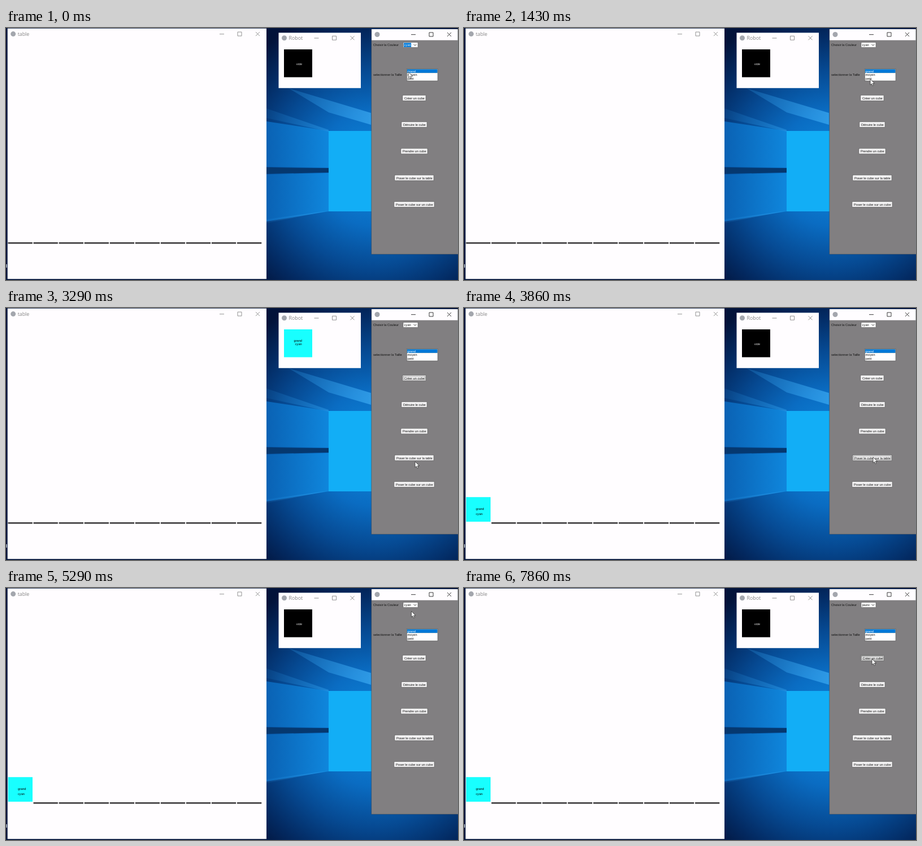
Animation, 800 px wide and 448 px high, one loop 8000 ms. Source, as an HTML page:

```html
<!DOCTYPE html>
<html lang="fr">
<head>
<meta charset="utf-8">
<title>Robot et cubes</title>
<style>
  html, body { margin: 0; width: 100%; height: 100%; overflow: hidden; background: #04183f; }
  svg { display: block; width: 800px; height: 448px; }
  text { font: 5.65px "Liberation Sans", Arial, sans-serif; white-space: pre; }
  .title { font: 8.8px "Open Sans", sans-serif; fill: #858585; }
</style>
</head>
<body>
<svg viewBox="0 0 800 448">
  <defs>
    <radialGradient id="sky" gradientUnits="userSpaceOnUse" cx="650" cy="250" r="290">
      <stop offset="0" stop-color="#0d8be0"/>
      <stop offset=".35" stop-color="#0a6cc2"/>
      <stop offset=".6" stop-color="#064a93"/>
      <stop offset=".82" stop-color="#032a62"/>
      <stop offset="1" stop-color="#02133a"/>
    </radialGradient>
    <linearGradient id="beam">
      <stop offset="0" stop-color="#0a62b4"/>
      <stop offset="1" stop-color="#0f86dc"/>
    </linearGradient>
    <linearGradient id="glow">
      <stop offset="0" stop-color="#2a9df0" stop-opacity=".1"/>
      <stop offset="1" stop-color="#4bbcff" stop-opacity=".55"/>
    </linearGradient>
    <clipPath id="comboText"><rect x="703" y="25" width="14.5" height="10"/></clipPath>
  </defs>
  <rect width="800" height="448" fill="#03153c"/>
  <rect x="461" width="339" height="448" fill="url(#sky)"/>
  <path d="M461 166L571 183V248L461 247ZM461 260L571 258V326L461 344Z" fill="url(#beam)"/>
  <path d="M461 143L571 181V184L461 160ZM500 107L646 151V172L571 150ZM571 325L461 340V347Z" fill="url(#glow)"/>
  <path d="M461 248L571 249V257L461 259Z" fill="#05386f"/>
  <rect x="571" y="183" width="143" height="143" fill="#12aef6"/>
  <rect y="420" width="1.6" height="6" fill="#aeb6c4"/>
  <g id="windows"></g>
  <g id="live"></g>
</svg>
<script>
const WHITE = '#fffdff', BLUE = '#0078d7', CYAN = '#18ffff', BLACK = '#000';
const FPS = 7, LOOP = 8000;

const rect = (x, y, w, h, fill, extra = '') =>
  `<rect x="${x}" y="${y}" width="${w}" height="${h}" fill="${fill}" ${extra}/>`;
const text = (x, y, string, fill = '#111', extra = '') =>
  `<text x="${x}" y="${y}" fill="${fill}" ${extra}>${string}</text>`;
const stroke = (d, color, width = 1) =>
  `<path d="${d}" fill="none" stroke="${color}" stroke-width="${width}"/>`;

// x, y: centre of the minimise button; the other two follow to its right
function windowFrame(left, top, width, height, title, x, y, ink) {
  return rect(left, top, width, height, WHITE) +
    `<circle cx="${left + 10}" cy="${y}" r="4.5" fill="#a3a6ad"/>` +
    `<text class="title" x="${left + 18}" y="${y + 3.6}">${title}</text>` +
    stroke(`M${x - 4} ${y + .2}h8M${x + 28} ${y - 3.5}h7v7h-7zM${x + 60} ${y - 3.5}l7 7m0 -7l-7 7`, ink, .9);
}

const buttons = [
  ['Créer un cube', 41, 119.7], ['Détruire le cube', 45, 167],
  ['Prendre un cube', 47, 214.3], ['Poser le cube sur la table', 69, 261.6],
  ['Poser le cube sur un cube', 71, 308.9]
];
const TAKE = 0, PUT = 3;

function button([label, width, y], focused, pressed) {
  const x = 722.6 - width / 2, shift = pressed ? .6 : 0;
  return rect(x, y, width, 9.6, pressed ? '#e2e2e2' : '#f1f0f1', 'stroke="#5c5c5c" stroke-width=".7"') +
    stroke(`M${x + .7} ${y + 9}V${y + .7}H${x + width - .7}`, pressed ? '#777' : '#fff', .7) +
    (focused ? rect(x + 1.5, y + 1.5, width - 3, 6.6, 'none', 'stroke="#777" stroke-width=".6"') : '') +
    text(722.8 + shift, y + 7 + shift, label, '#111', 'text-anchor="middle"');
}

function combo(color, focused, hovered) {
  return rect(703, 25.6, 26, 9, '#fff', 'stroke="#5b5b5b" stroke-width=".6"') +
    (focused ? rect(704, 26.5, 13.2, 7.4, BLUE) : '') +
    (hovered ? rect(718.5, 25.8, 10.4, 8.6, '#d5edfb', `stroke="${BLUE}" stroke-width=".5"`) : '') +
    `<g clip-path="url(#comboText)">${text(704.8, 32, color, focused ? '#fff' : '#111')}</g>` +
    stroke('M721.5 28.9l2.4 2.4l2.4 -2.4', '#333', .9);
}

function sizeList(selected) {
  return rect(709.3, 72.7, 54.8, 21.3, '#fff', 'stroke="#555" stroke-width=".7"') +
    ['grand', 'moyen', 'petit'].map((size, i) => {
      const y = 73.2 + i * 6.7, on = i === selected;
      return (on ? rect(709.7, y, 54, 6.7, BLUE, 'stroke="#b98a4a" stroke-width=".4" stroke-dasharray=".6"') : '') +
        text(710.6, y + 5.3, size, on ? '#fff' : '#111');
    }).join('');
}

function robot(full) {
  return rect(492, 38, 50, 49.5, full ? CYAN : BLACK) + (full
    ? text(509.5, 59.6, 'grand', BLACK) + text(511.8, 66.4, 'cyan', BLACK)
    : text(513.8, 66.4, 'vide', '#ddd'));
}

function table(occupied) {
  let out = '';
  for (let i = occupied ? 1 : 0; i < 10; i++) out += rect(3.5 + i * 45.05, 381, 43.3, 2.5, '#353335');
  return occupied
    ? out + rect(3.7, 336.2, 43.3, 43.7, CYAN) + text(21, 359, 'grand', BLACK) + text(21, 368, 'cyan', BLACK)
    : out;
}

// pointer path: step, x, y
const path = [
  [0, 712, 78], [2, 713, 80], [5, 719, 86], [8, 719, 82], [9, 718, 76], [12, 722, 133],
  [13, 723, 125], [15, 723, 122], [17, 723, 128], [23, 724, 273], [25, 724, 267], [27, 724, 265],
  [31, 722, 32], [32, 722, 29], [34, 722, 29], [39, 715, 48], [41, 716, 52], [44, 723, 111],
  [46, 723, 123], [48, 720, 77], [50, 720, 77], [53, 722, 130], [55, 722, 126]
];

function pointer(step) {
  const next = Math.max(1, path.findIndex(p => p[0] >= step));
  const [a, ax, ay] = path[next - 1], [b, bx, by] = path[next];
  let k = (step - a) / (b - a);
  k = k * k * (3 - 2 * k);
  return `<path transform="translate(${ax + (bx - ax) * k} ${ay + (by - ay) * k})"
    d="M0 0V10.4L2.4 8.2L4.1 12L5.8 11.2L4.2 7.6H7.5Z" fill="#fff" stroke="#222" stroke-width=".7"/>`;
}

function scene(step) {
  const between = (from, to) => step >= from && step < to;
  const focus = between(14, 26) || step >= 55 ? TAKE : between(26, 33) ? PUT : -1;
  const pressed = step >= 55 ? TAKE : -1;
  return table(step >= 26) + robot(between(14, 26)) +
    combo(step < 41 ? 'cyan' : 'jaune', step < 2 || between(41, 48), between(31, 35)) +
    sizeList(between(2, 4) ? 1 : between(4, 9) ? 2 : 0) +
    buttons.map((b, i) => button(b, i === focus, i === pressed)).join('') +
    pointer(step);
}

document.getElementById('windows').innerHTML =
  windowFrame(2.7, .8, 458.3, 445.4, 'table', 382, 10.6, '#858585') +
  windowFrame(482.5, 8.4, 145.5, 98.4, 'Robot', 549.5, 17.8, '#858585') +
  windowFrame(647, 2, 153, 400, '', 721, 11.5, '#222') +
  rect(647, 21.7, 152.6, 380.3, '#817f81') +
  stroke('M646.7 2V402.2H799.7V2', '#474d56', .6) +
  text(650, 32.2, 'Choisir la Couleur') + text(650, 85.4, 'selectionner la Taille');

const live = document.getElementById('live');
let shown = -1;
function play(now) {
  // the small bias keeps steps aligned with times rounded down to 10 ms
  const step = Math.min(55, Math.floor((now % LOOP + 8) * FPS / 1000));
  if (step !== shown) live.innerHTML = scene(shown = step);
  requestAnimationFrame(play);
}
play(performance.now());
</script>
</body>
</html>
```
